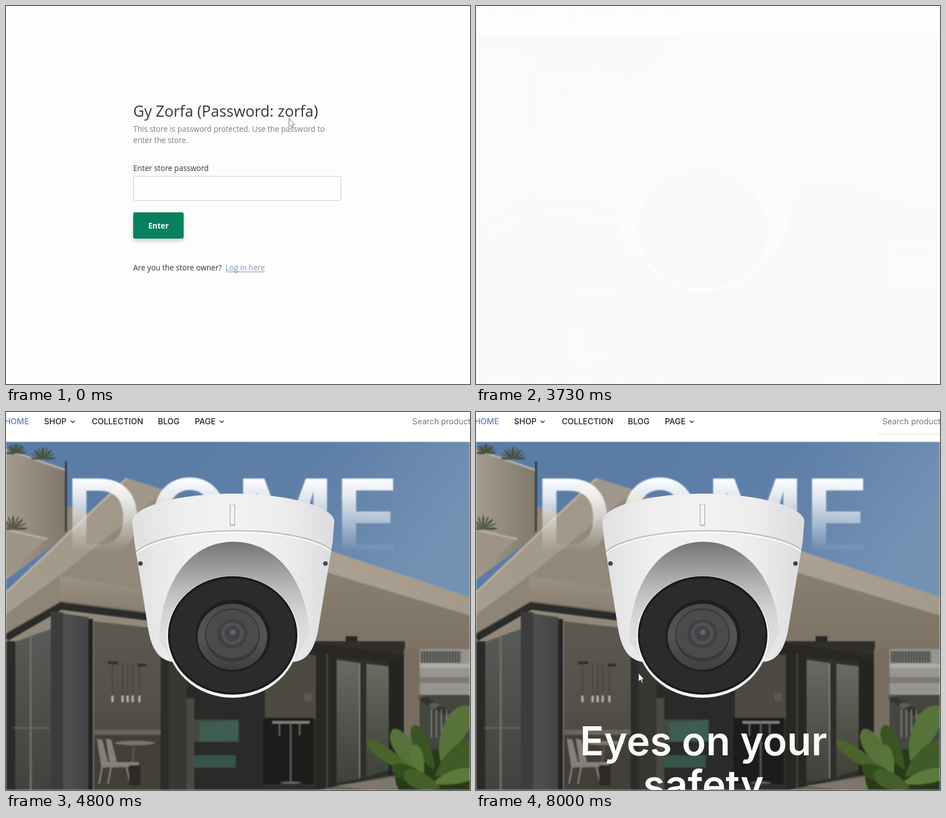
An HTML page with a canvas that plays this animation: 828 px wide and 676 px high, repeating every 8070 ms.

```html
<!DOCTYPE html>
<html lang="en">
<head>
<meta charset="utf-8">
<title>Store preview</title>
<style>
html, body { margin: 0; width: 100%; height: 100%; overflow: hidden; background: #fdfdfd; }
canvas { display: block; }
</style>
</head>
<body>
<canvas id="stage" width="828" height="676"></canvas>
<script>
const W = 828, H = 676, LOOP = 8070;
const ctx = document.getElementById('stage').getContext('2d');
const SANS = '"Open Sans", "Noto Sans", sans-serif';
const GEO = 'Inter, Roboto, sans-serif';

const clamp = v => Math.max(0, Math.min(1, v));
const progress = (t, from, to) => clamp((t - from) / (to - from));
const smooth = u => u * u * (3 - 2 * u);
const easeOut = u => 1 - (1 - u) ** 3;

function text(c, str, x, y, font, color, align = 'left') {
  c.font = font;
  c.fillStyle = color;
  c.textAlign = align;
  c.fillText(str, x, y);
}

function poly(c, color, ...p) {
  c.beginPath();
  for (let i = 0; i < p.length; i += 2) c.lineTo(p[i], p[i + 1]);
  c.closePath();
  c.fillStyle = color;
  c.fill();
}

function line(c, color, width, ...p) {
  c.beginPath();
  for (let i = 0; i < p.length; i += 2) c.lineTo(p[i], p[i + 1]);
  c.strokeStyle = color;
  c.lineWidth = width;
  c.stroke();
}

function rect(c, color, x, y, w, h) {
  c.fillStyle = color;
  c.fillRect(x, y, w, h);
}

function oval(c, color, x, y, rx, ry = rx) {
  c.beginPath();
  c.ellipse(x, y, rx, ry, 0, 0, Math.PI * 2);
  c.fillStyle = color;
  c.fill();
}

function ramp(c, x0, y0, x1, y1, ...colors) {
  const g = c.createLinearGradient(x0, y0, x1, y1);
  colors.forEach((color, i) => g.addColorStop(i / (colors.length - 1), color));
  return g;
}

function layer(draw) {
  const canvas = document.createElement('canvas');
  canvas.width = W;
  canvas.height = H;
  draw(canvas.getContext('2d'));
  return canvas;
}

function leaf(c, x, y, length, width, angle, color) {
  c.save();
  c.translate(x, y);
  c.rotate(angle);
  c.beginPath();
  c.moveTo(0, 0);
  c.bezierCurveTo(length * .35, -width, length * .95, -width, length, 0);
  c.bezierCurveTo(length * .95, width * .8, length * .35, width * .6, 0, 0);
  c.fillStyle = color;
  c.fill();
  c.restore();
}

function palm(c, x, y, size) {
  for (let i = 0; i < 9; i++) {
    leaf(c, x, y, size, 2.5, Math.PI * (1.02 + i * .12), i % 2 ? '#535b45' : '#3c4234');
  }
}

function drawHouse(c) {
  rect(c, ramp(c, 300, 53, 700, 350, '#5a7ca5', '#5f80a8', '#7492b4'), 0, 53, W, 320);

  // terrace on the left
  poly(c, ramp(c, 0, 0, 107, 0, '#a39b8c', '#80786b'), 0, 66, 107, 104, 107, 222, 0, 300);
  line(c, '#bdb5a6', 3, 0, 67, 107, 104);
  poly(c, '#8d8578', 107, 168, 150, 182, 150, 190, 107, 230);
  poly(c, '#9d9485', 0, 210, 74, 226, 0, 292);
  line(c, '#bab2a3', 3, 0, 211, 74, 227);
  line(c, '#2b2e31', 3, 107, 88, 107, 214);
  palm(c, 66, 84, 22);
  palm(c, 18, 74, 18);
  palm(c, 13, 210, 25);

  // roof and overhang
  poly(c, '#91887a', 0, 325, 215, 118, 300, 150, 585, 252, 828, 332, 828, 428, 560, 430, 250, 420, 0, 420);
  poly(c, ramp(c, 0, 330, 230, 130, '#a59c8d', '#a0978a'), 0, 322, 215, 118, 285, 140, 95, 293, 0, 362);
  line(c, '#b7ae9f', 4, 0, 323, 215, 119);
  poly(c, ramp(c, 0, 295, 0, 362, '#9c9283', '#877d6f'), 95, 293, 250, 318, 250, 362, 98, 342);
  poly(c, '#8f8577', 0, 362, 95, 293, 98, 342, 0, 398);
  poly(c, ramp(c, 0, 290, 0, 425, '#897f70', '#7d7364'), 555, 280, 828, 362, 828, 426, 738, 426, 540, 412);
  poly(c, ramp(c, 570, 0, 828, 0, '#aaa192', '#a39a8b'), 560, 245, 585, 250, 828, 331, 828, 364, 560, 283);

  // rooms behind the glass
  rect(c, '#2f2e2a', 0, 410, 712, 266);
  poly(c, ramp(c, 0, 400, 0, 676, '#575a56', '#41433e'), 8, 414, 80, 388, 80, 676, 8, 676);
  line(c, '#2b2a28', 13, 10, 412, 10, 676);
  line(c, '#6d6d66', 4, 44, 402, 44, 676);
  line(c, '#677169', 2, 14, 565, 78, 565);
  poly(c, ramp(c, 0, 375, 0, 676, '#5c5950', '#54514a', '#3b3933'), 155, 374, 276, 388, 276, 676, 155, 676);
  rect(c, '#68665c', 158, 568, 118, 9);
  rect(c, '#413f38', 158, 578, 118, 98);
  rect(c, '#383732', 290, 440, 32, 236);
  rect(c, '#2a2b28', 322, 490, 140, 186);
  rect(c, '#3f4a44', 336, 550, 80, 40);
  poly(c, '#3f5c50', 345, 555, 414, 552, 414, 588, 345, 590);
  rect(c, '#38544a', 336, 614, 74, 22);
  rect(c, '#4d4a42', 462, 434, 91, 115);
  rect(c, '#5b5a52', 533, 503, 13, 14);
  rect(c, '#1c1c1b', 459, 547, 90, 118);
  line(c, '#85867f', 5, 475, 555, 542, 555);
  line(c, '#62645f', 3, 508, 555, 508, 662);
  line(c, '#676964', 3, 488, 556, 488, 579);
  line(c, '#676964', 3, 524, 556, 524, 578);
  oval(c, '#62645f', 508, 663, 18, 2.5);

  // dining furniture
  for (const x of [190, 208, 217, 226, 238]) {
    line(c, '#33322f', 1, x, 448, x, 508);
    rect(c, '#b5b2a3', x - 2, 507, 4, 12);
  }
  rect(c, '#302f2b', 182, 446, 18, 5);
  rect(c, '#302f2b', 235, 450, 15, 5);
  oval(c, '#7b7669', 230, 592, 36, 4);
  line(c, '#575247', 4, 228, 595, 223, 660);
  for (const x of [162, 178]) {
    poly(c, '#85817a', x, 584, x + 10, 586, x + 20, 626, x + 60, 626, x + 58, 634, x + 8, 636);
    line(c, '#85817a', 3, x + 10, 632, x + 4, 665);
    line(c, '#85817a', 3, x + 52, 632, x + 61, 668);
  }
  rect(c, '#2d2926', 220, 632, 20, 36);

  // frames and pillars
  line(c, '#2b2b2a', 13, 0, 404, 98, 347, 265, 368);
  line(c, '#6a655c', 2, 0, 396, 98, 339, 260, 359);
  poly(c, ramp(c, 80, 0, 148, 0, '#515151', '#4d4d4e', '#424345'), 80, 357, 147, 367, 147, 676, 80, 676);
  rect(c, '#3c3c3c', 80, 358, 22, 318);
  line(c, '#232323', 8, 151, 370, 151, 676);
  line(c, '#7d7b72', 2, 156, 376, 156, 676);
  rect(c, '#2c2c2a', 276, 430, 14, 246);
  rect(c, '#4a4943', 322, 512, 14, 164);
  poly(c, '#292825', 520, 410, 712, 435, 712, 449, 520, 432);
  rect(c, '#282723', 553, 425, 36, 251);
  rect(c, '#413f39', 571, 432, 4, 244);
  poly(c, ramp(c, 0, 440, 0, 660, '#6a6b64', '#54554d', '#40423b'), 590, 443, 632, 449, 632, 656, 590, 663);
  poly(c, ramp(c, 0, 440, 0, 660, '#6c6d66', '#54564c', '#3d4034'), 643, 450, 683, 455, 683, 640, 643, 653);
  line(c, '#8f8d83', 2, 631, 450, 631, 655);
  rect(c, '#252420', 683, 440, 27, 218);
  rect(c, '#776e61', 710, 424, 28, 246);
  rect(c, '#292825', 606, 401, 21, 10);

  // neighbouring building, trees and paving
  rect(c, '#989590', 738, 424, 90, 84);
  rect(c, '#6d6d67', 740, 428, 72, 20);
  for (let x = 742; x < 812; x += 5) line(c, '#3e423f', 1.5, x, 427, x, 449);
  rect(c, '#aeaba5', 738, 450, 90, 8);
  rect(c, '#7d7b75', 738, 474, 90, 11);
  rect(c, '#44473f', 738, 506, 90, 100);
  for (let i = 0; i < 22; i++) {
    oval(c, i % 3 ? '#32362e' : '#5a5e55', 742 + i * 37 % 84, 510 + i * 23 % 52, 8, 5);
  }
  for (let x = 758; x < 790; x += 9) rect(c, '#85847d', x, 532, 2, 50);
  poly(c, '#67625a', 555, 676, 690, 650, 828, 666, 828, 676);
  poly(c, '#7d776e', 590, 668, 690, 654, 735, 671, 650, 676);

  // broad-leaved plant
  oval(c, '#283a19', 765, 655, 70, 52);
  leaf(c, 742, 652, 118, 18, 3.72, '#4a642c');
  leaf(c, 745, 645, 95, 26, 4.1, '#56713a');
  leaf(c, 765, 640, 88, 22, 4.28, '#3a5522');
  leaf(c, 775, 625, 112, 34, 5.2, '#56733a');
  leaf(c, 765, 652, 112, 36, 5.72, '#3f5c28');
  leaf(c, 762, 660, 78, 22, 3.48, '#314d1e');
  leaf(c, 760, 665, 85, 20, 6.05, '#5d7a3d');
  leaf(c, 745, 650, 58, 18, 4.42, '#5a773a');
  leaf(c, 775, 672, 70, 24, 3.55, '#435f2a');
}

function drawHeadline(c) {
  const fade = c.createLinearGradient(0, 119, 0, 250);
  fade.addColorStop(0, 'rgba(255,255,255,.98)');
  fade.addColorStop(.25, 'rgba(255,255,255,.82)');
  fade.addColorStop(.65, 'rgba(255,255,255,.4)');
  fade.addColorStop(1, 'rgba(255,255,255,0)');
  [['D', 174], ['O', 328], ['M', 498], ['E', 644]].forEach(([letter, x]) =>
    text(c, letter, x, 259, `600 193px ${GEO}`, fade, 'center'));
}

function drawCamera(c) {
  // housing
  c.beginPath();
  c.moveTo(225, 194);
  c.bezierCurveTo(231, 166, 315, 146, 405, 146);
  c.bezierCurveTo(494, 146, 580, 166, 586, 194);
  c.lineTo(583, 232);
  c.lineTo(557, 390);
  c.bezierCurveTo(550, 425, 537, 446, 511, 447);
  c.lineTo(297, 447);
  c.bezierCurveTo(272, 443, 260, 423, 254, 390);
  c.lineTo(229, 232);
  c.closePath();
  c.fillStyle = ramp(c, 225, 0, 586, 0, '#e0e0e1', '#efeff0', '#f2f2f3', '#ededee', '#dcdcde');
  c.fill();

  c.save();
  c.clip();
  const seam = () => {
    c.beginPath();
    c.moveTo(231, 251);
    c.bezierCurveTo(285, 201, 525, 199, 582, 248);
  };
  seam();
  c.strokeStyle = '#b8b8ba';
  c.lineWidth = 2;
  c.stroke();
  c.translate(0, 3);
  seam();
  c.strokeStyle = '#fafafa';
  c.stroke();
  c.restore();

  rect(c, '#c4c4c6', 399, 165, 10, 39);
  rect(c, '#f6f6f6', 401, 166, 6, 35);
  oval(c, '#454547', 240, 271, 4);
  oval(c, '#454547', 570, 271, 4);

  // shaded recess around the eyeball
  c.beginPath();
  c.moveTo(273, 408);
  c.bezierCurveTo(276, 316, 320, 233, 405, 232);
  c.bezierCurveTo(482, 232, 536, 300, 541, 395);
  c.lineTo(518, 440);
  c.lineTo(294, 440);
  c.closePath();
  c.fillStyle = ramp(c, 0, 232, 0, 400, '#747476', '#98989a', '#bababc', '#d3d3d5', '#dededf');
  c.fill();

  // face and lens
  oval(c, '#f3f3f3', 404.5, 402, 118, 109);
  oval(c, '#191a1b', 404.5, 399.5, 115.5, 106);
  oval(c, '#2b2b2c', 404.5, 399.5, 112, 102);
  oval(c, '#1f1f20', 405, 400, 67, 64);
  oval(c, ramp(c, 0, 340, 0, 460, '#4a4a4c', '#565456', '#403f41'), 404, 402, 62, 59);
  oval(c, '#39393b', 404, 399, 49, 48);
  oval(c, '#4c4a4c', 404, 397, 47, 43);
  oval(c, '#414143', 404, 397, 27, 26);
  oval(c, '#525254', 404, 396, 20);
  oval(c, '#434447', 404, 396, 14);
  oval(c, '#626466', 405, 394, 5);
}

function chevron(c, x) {
  line(c, '#222', 1.4, x - 3.5, 15.5, x, 19, x + 3.5, 15.5);
}

function drawNav(c) {
  const font = `500 14.3px ${GEO}`;
  rect(c, '#fff', 0, 0, W, 53);
  text(c, 'HOME', 41, 22, font, '#5d7eb5', 'right');
  [['SHOP', 68], ['COLLECTION', 153], ['BLOG', 271], ['PAGE', 337]].forEach(([label, x]) =>
    text(c, label, x, 22, font, '#202020'));
  chevron(c, 119);
  chevron(c, 385);
  text(c, 'Search product', 725, 22, `14.3px ${GEO}`, '#77777b');
}

const home = layer(c => {
  rect(c, '#fff', 0, 0, W, H);
  const scene = layer(s => {
    drawHouse(s);
    drawHeadline(s);
  });
  c.filter = 'blur(1.2px)';
  c.drawImage(scene, 0, 0);
  c.filter = 'blur(0.6px)';
  drawCamera(c);
  c.filter = 'none';
  drawNav(c);
});

function drawArrow(x, y, fill, stroke) {
  ctx.save();
  ctx.translate(x, y);
  ctx.beginPath();
  [[0, 0], [0, 15], [3.5, 12], [6, 17.5], [8, 16.5], [5.8, 11.2], [10, 11]]
    .forEach(p => ctx.lineTo(...p));
  ctx.closePath();
  ctx.fillStyle = fill;
  ctx.fill();
  ctx.strokeStyle = stroke;
  ctx.lineWidth = 1;
  ctx.stroke();
  ctx.restore();
}

function drawField(t) {
  const focused = t >= 200;
  ctx.beginPath();
  ctx.roundRect(227.5, 304.5, 370, 43, 2);
  ctx.fillStyle = '#fefefe';
  ctx.fill();
  ctx.strokeStyle = focused ? '#6f8fb5' : '#c9cacc';
  ctx.lineWidth = focused ? 2 : 1;
  ctx.stroke();

  const typed = t < 1670 ? 0 : Math.min(5, 1 + Math.floor((t - 1670) / 165));
  for (let i = 0; i < typed; i++) oval(ctx, '#333', 245.5 + i * 8, 326, 2.7);
  const caretOn = focused && (typed > 0 || Math.floor((t - 200) / 535) % 2 === 0);
  if (caretOn) rect(ctx, '#333', 242 + typed * 8, 319, 1, 14);
}

function drawLogin(t) {
  const body = `13.6px ${SANS}`;
  ctx.save();
  ctx.globalAlpha = 1 - progress(t, 2500, 2870);
  text(ctx, 'Gy Zorfa (Password: zorfa)', 227, 198, `27px ${SANS}`, '#353638');
  text(ctx, 'This store is password protected. Use the password to', 227, 225, body, '#797c80');
  text(ctx, 'enter the store.', 227, 245, body, '#797c80');
  text(ctx, 'Enter store password', 227, 295, body, '#333538');
  drawField(t);

  ctx.save();
  ctx.shadowColor = 'rgba(0,0,0,.2)';
  ctx.shadowBlur = 9;
  ctx.shadowOffsetY = 4;
  ctx.beginPath();
  ctx.roundRect(227, 369, 90, 47, 3);
  ctx.fillStyle = '#088060';
  ctx.fill();
  ctx.restore();
  text(ctx, 'Enter', 272, 398, `700 13.6px ${SANS}`, '#fff', 'center');

  text(ctx, 'Are you the store owner?', 227, 473, body, '#333538');
  text(ctx, 'Log in here', 391.5, 473, body, '#7a94b4');
  rect(ctx, '#7a94b4', 391.5, 475, ctx.measureText('Log in here').width, 1);

  if (t < 270) {
    const u = smooth(progress(t, 70, 270));
    drawArrow(505 - 85 * u, 201 + 125 * u, '#fdfdfd', '#66686c');
  }
  ctx.restore();
}

function drawHome(t) {
  ctx.save();
  ctx.globalAlpha = smooth(progress(t, 3700, 4200));
  ctx.drawImage(home, 0, 0);
  const u = progress(t, 4800, 6530);
  if (u > 0) {
    const font = `600 70.8px ${GEO}`, drop = 210 * (1 - easeOut(u));
    ctx.globalAlpha = 1 - (1 - u) ** 2;
    text(ctx, 'Eyes on your', 406, 614 + drop, font, '#fcfcfb', 'center');
    text(ctx, 'safety', 406, 692 + drop, font, '#fcfcfb', 'center');
  }
  if (t >= 6800) rect(ctx, '#dedee0', 716, 39, 112, 1);
  if (t >= 7730) {
    const move = easeOut(progress(t, 7730, 8000));
    drawArrow(180 + 110 * move, 640 - 173 * move, '#fff', '#353535');
  }
  ctx.restore();
}

function frame(now) {
  const t = now % LOOP;
  rect(ctx, '#fdfdfd', 0, 0, W, H);
  if (t < 2870) drawLogin(t);
  else if (t >= 3730) drawHome(t);
  requestAnimationFrame(frame);
}
requestAnimationFrame(frame);
</script>
</body>
</html>
```
